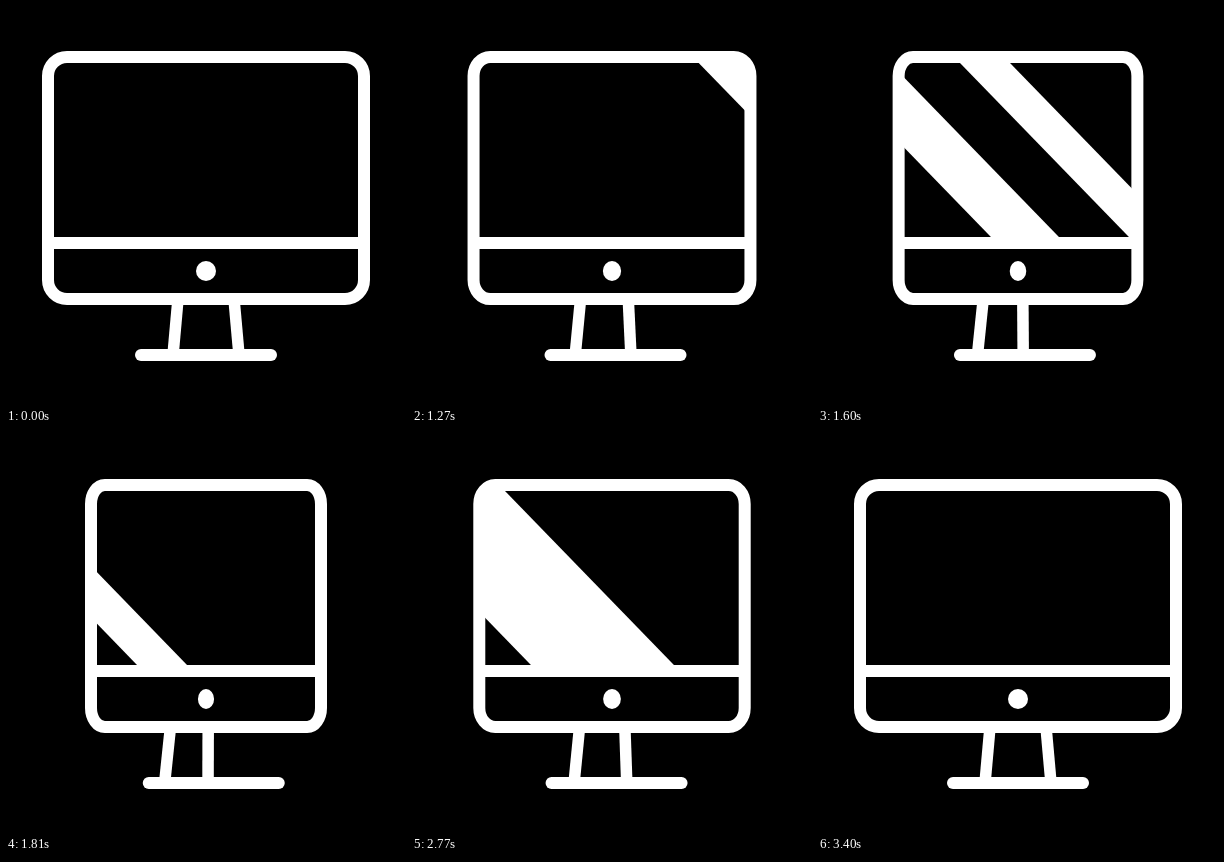
Recreate the animation shown at these times as an HTML page with a canvas. Size 400 px wide and 400 px high, loop 3430 ms.

```html
<!DOCTYPE html>
<html lang="en">
<head>
<meta charset="utf-8">
<title>Monitor</title>
<style>
html, body { margin: 0; width: 100%; height: 100%; overflow: hidden; background: #000; }
canvas { display: block; }
</style>
</head>
<body>
<canvas id="stage" width="400" height="400"></canvas>
<script>
const ctx = document.getElementById('stage').getContext('2d');
const LOOP = 3430, HOLD = 1000, STEP = 30;
const MAX_SQUEEZE = 45;
const SLOPE = 1.03;
const SCREEN_TOP = 57, SCREEN_BOTTOM = 237;

const curve = (s, a, b) => 3 * (1 - s) ** 2 * s * a + 3 * (1 - s) * s * s * b + s ** 3;

// Cubic easing with handles at (x1, 0) and (x2, 1)
function ease(x, x1, x2) {
  if (x <= 0) return 0;
  if (x >= 1) return 1;
  let lo = 0, hi = 1;
  for (let i = 0; i < 30; i++) {
    const mid = (lo + hi) / 2;
    if (curve(mid, x1, x2) < x) lo = mid; else hi = mid;
  }
  return curve(lo, 0, 1);
}

function squeezeAt(k) {
  const turn = k < 40 ? ease(k / 38, 0.25, 0.12) : 1 - ease((k - 40) / 40, 0.6, 0.4);
  return MAX_SQUEEZE * turn;
}

function line(x1, y1, x2, y2, width, cap = 'butt') {
  ctx.lineWidth = width;
  ctx.lineCap = cap;
  ctx.beginPath();
  ctx.moveTo(x1, y1);
  ctx.lineTo(x2, y2);
  ctx.stroke();
}

// The outline narrows while its stroke keeps its weight
function casePath(half) {
  ctx.save();
  ctx.translate(200, 0);
  ctx.scale(half / 158, 1);
  ctx.beginPath();
  ctx.roundRect(-158, 51, 316, 242, 19);
  ctx.restore();
}

// Diagonal band; left and right are its edges along the screen top
function band(left, right) {
  const edge = (x, y) => x + (y - SCREEN_TOP) / SLOPE;
  const top = 45, bottom = 245;
  ctx.beginPath();
  ctx.moveTo(edge(left, top), top);
  ctx.lineTo(edge(right, top), top);
  ctx.lineTo(edge(right, bottom), bottom);
  ctx.lineTo(edge(left, bottom), bottom);
  ctx.fill();
}

function glare(k) {
  if (k < 40) {
    const x = 4 - 25.7 * (k - 20);
    band(x, x + 68);
    band(x + 138, x + 188);
  } else {
    const left = -50 + 26.9 * (k - 59);
    const right = 93 + 23.4 * (k - 59);
    if (right > left) band(left, right);
  }
}

function draw(k) {
  const d = squeezeAt(k);
  const half = 158 - d;
  ctx.fillStyle = '#000';
  ctx.fillRect(0, 0, 400, 400);
  ctx.fillStyle = ctx.strokeStyle = '#fff';

  ctx.save();
  casePath(half);
  ctx.clip();
  ctx.beginPath();
  ctx.rect(0, 45, 400, SCREEN_BOTTOM - 45);
  ctx.clip();
  if (k > 0) glare(k);
  ctx.restore();

  casePath(half);
  ctx.lineWidth = 12;
  ctx.stroke();
  line(200 - half, SCREEN_BOTTOM, 200 + half, SCREEN_BOTTOM, 12);

  ctx.beginPath();
  ctx.ellipse(200, 265, 10 - 0.045 * d, 10, 0, 0, Math.PI * 2);
  ctx.fill();

  line(172 - 0.175 * d, 293, 167 - 0.195 * d, 349, 11.5);
  line(228 - 0.6 * d, 293, 233 - 0.72 * d, 349, 11.5);
  line(135 + 0.18 * d, 349, 265 + 0.18 * d, 349, 12, 'round');
}

function tick() {
  const t = performance.now() % LOOP;
  draw(Math.max(0, Math.floor((t - HOLD) / STEP)));
  requestAnimationFrame(tick);
}
tick();
</script>
</body>
</html>
```
